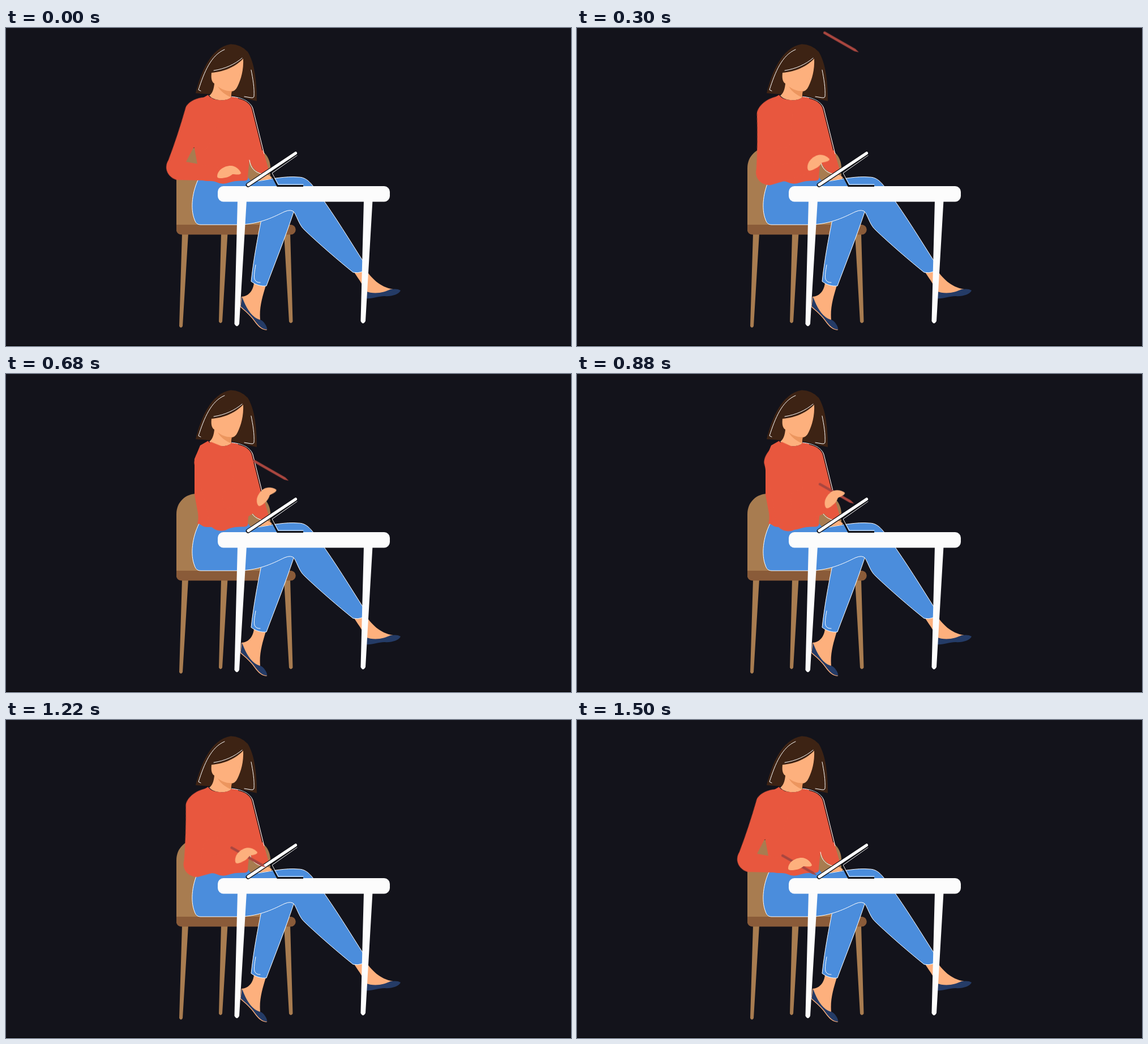
Animation of 998x561 px, one loop 2000 ms. Source, as an HTML page:

```html
<!DOCTYPE html>
<html lang="en">
<head>
<meta charset="utf-8">
<title>Woman at a tablet</title>
<style>
  html, body { margin: 0; width: 100%; height: 100%; overflow: hidden; background: #13131b; }
  svg { display: block; width: 100vw; height: 100vh; }

  .line { fill: none; stroke: #fff; stroke-width: 1; stroke-linecap: round; stroke-linejoin: round; }
  .wood { fill: #a87c50; }
  .seat { fill: #8a5b39; }
  .skin { fill: #fdb07d; }
  .hair { fill: #3d2314; }
  .red { fill: #e8573e; }
  .jeans { fill: #4b8ddc; stroke: #fff; stroke-width: 1; stroke-linejoin: round; }
  .shoe { fill: #243b66; }
  .table { fill: #fcfcfc; }
  .ink { fill: none; stroke: #101014; }
  .pencil { fill: #a9463f; }

  .arm { animation: swing 2s linear infinite; }
  .pencil { animation: drop 2s linear infinite; }

  /* The arm reaches up for 750 ms, returns for 750 ms, then rests. */
  @keyframes swing {
    0%, 75%, 100% { transform: translate(351px, 146px) rotate(24.7deg); }
    15%, 60% { transform: translate(351.5px, 146px) rotate(7deg); }
    25%, 50% { transform: translate(359.5px, 146px) rotate(0deg); }
    37.5% { transform: translate(366px, 146px) rotate(-11deg); }
  }

  /* The pencil falls into the hand and is carried to the tablet. */
  @keyframes drop {
    0% { transform: translate(434px, -108px) rotate(29.7deg); }
    37.5% { transform: translate(437px, 179px) rotate(29.7deg); }
    44% { transform: translate(427px, 193px) rotate(29.7deg); }
    55% { transform: translate(410px, 217px) rotate(29.7deg); }
    67% { transform: translate(383px, 231px) rotate(29.7deg); }
    75%, 100% { transform: translate(361px, 238px) rotate(29.7deg); }
  }
</style>
</head>
<body>
<svg viewBox="0 0 998 561" preserveAspectRatio="none">
  <rect width="998" height="561" fill="#13131b"/>
  <rect y="560" width="998" height="1" fill="#000"/>

  <g id="chair">
    <path class="wood" d="M301 350V247C301 226 317 211 338 211H432C453 211 467 227 467 247V350Z"/>
    <path class="wood" d="M311 362H322L312 526Q309 531 306 526ZM380 362H391.500L382 518Q379 523 376 518ZM491 362H502L506.500 518Q503 523 500 518Z"/>
    <path class="seat" d="M301 347H503A8.500 8.500 0 0 1 503 364.500H310Q303 364 301 358Z"/>
  </g>

  <g id="feet">
    <path class="skin" d="M438 449C437 462 430 473 416 474L413.500 492C424 501 432 508 439 518C446 528 453 533 461 533L449 515C447 493 453 474 459 454Z"/>
    <path class="shoe" d="M417 474C422 489 433 512 450 515C456 518 461 526 461.500 532C453 532 447 526 440 517C433 507 425 500 414.500 491Z"/>
    <path class="skin" d="M615 431L634 424C645 441 660 457 684 461L668 470L636 471C633 455 624 445 615 431Z"/>
    <path class="shoe" d="M634 464C652 471 669 466 679 461C686 460 693 460 697 463C694 470 681 474 668 473C657 473 649 478 634 477Z"/>
  </g>

  <g id="legs">
    <path class="jeans" d="M451 338C444 372 437 410 433 447C441 453 450 456 460 455C475 415 493 370 508 325L505 315H460Z"/>
    <path class="line" d="M441 418C439 430 437 441 440 445C442 448 445 449 449 449"/>
    <path class="jeans" d="M341 264C329 288 325 318 333 338C335 344 338 347 344 347H412C450 346 475 332 492 324Q504 319 509 325C516 337 518 348 528 357C552 380 588 411 613 431Q621 433 629 430L633 415C608 376 582 333 553 293C540 276 533 263 516 263C495 261 470 266 446 270L426 261Z"/>
  </g>

  <g id="body">
    <path class="wood" d="M429 232L448 255L449 265L432 269L426 262Z"/>
    <path class="skin" d="M445 264C449 257 459 254 470 264L466 267L448 268Z"/>
    <path class="red" d="M357 118C361 126 375 128 386 127C392 126 397 124 398 121C415 123 431 130 436 142L456 222L465 254L456 258C444 256 434 247 430 233L427 262Q429 268 422 269.500C411 269 401 270 393 273Q382 277 372 272C362 268 354 272 347 268Q342 264 338 264C341 254 339 245 338 240L333 213V150L343 126Z"/>
    <path class="line" d="M399 121C418 123 432 130 436 142L456 222"/>
    <path class="ink" stroke-width="1.200" d="M410 124C424 127 432 134 434.800 143L453 216"/>
    <path class="line" d="M430 233C432 247 439 255 454 258"/>
  </g>

  <g id="head">
    <path class="hair" d="M397 28.500C362 34 344 78 335 115L362 117L400 119L443 129C443 92 439 62 427 42Q415 29 397 28.500Z"/>
    <path class="skin" d="M419 54C408 66 388 77 363 79C362 88 363 95 368 98C367 109 364 116 359 119C364 126 376 128 386 127Q397 125 398 121L397 112Q405 112 409 103C415 91 420 74 419 54Z"/>
    <path fill="#ec965f" d="M374 103C382 109 391 112 399 111L397 122C388 118 380 113 374 103Z"/>
    <path class="line" d="M386 38C362 48 350 78 340 109L344 111M367 75C387 72 404 64 417 53M433 74C436 89 439 106 438 121Q437 124 433 123L421 121"/>
  </g>

  <g id="desk" class="table">
    <path d="M409 304H425L412 522Q408 530 403.500 522ZM632 304H647.500L635 517Q630.500 525 626.500 517Z"/>
    <rect x="374" y="279" width="304" height="27.500" rx="10"/>
  </g>

  <g class="arm">
    <path class="red" d="M-33 8C-32 -6 -18 -21 2 -26L30 -10L32 62Q14 62 9 68L7.600 95.500L68.700 80Q77 90 74 102L6 131.500C-12 134 -24 121 -22 106Q-25 60 -33 8Z"/>
  </g>

  <g id="tablet">
    <path class="line" d="M514 225L470 256L481 276H525"/>
    <path class="ink" stroke-width="2.800" stroke-linejoin="round" d="M513 223.500L467 254.500L479.500 278.500H525"/>
    <path class="ink" stroke-width="7.600" stroke-linecap="round" d="M427.500 277L511.500 221"/>
    <path fill="none" stroke="#fff" stroke-width="5.200" stroke-linecap="round" d="M428 276.500L511.500 220.800"/>
  </g>

  <path class="pencil" d="M1.500 -2.300H64L72 0L64 2.300H1.500Q-1 0 1.500 -2.300Z"/>

  <g class="arm">
    <path class="skin" transform="rotate(-24.7) translate(-351 -146)" d="M373 262C373 252 384 243 397 243C405 243 413 250 415 256C414 260 405 258 400 258C394 263 387 265 378 265Q373 265 373 262Z"/>
  </g>
</svg>
</body>
</html>
```
